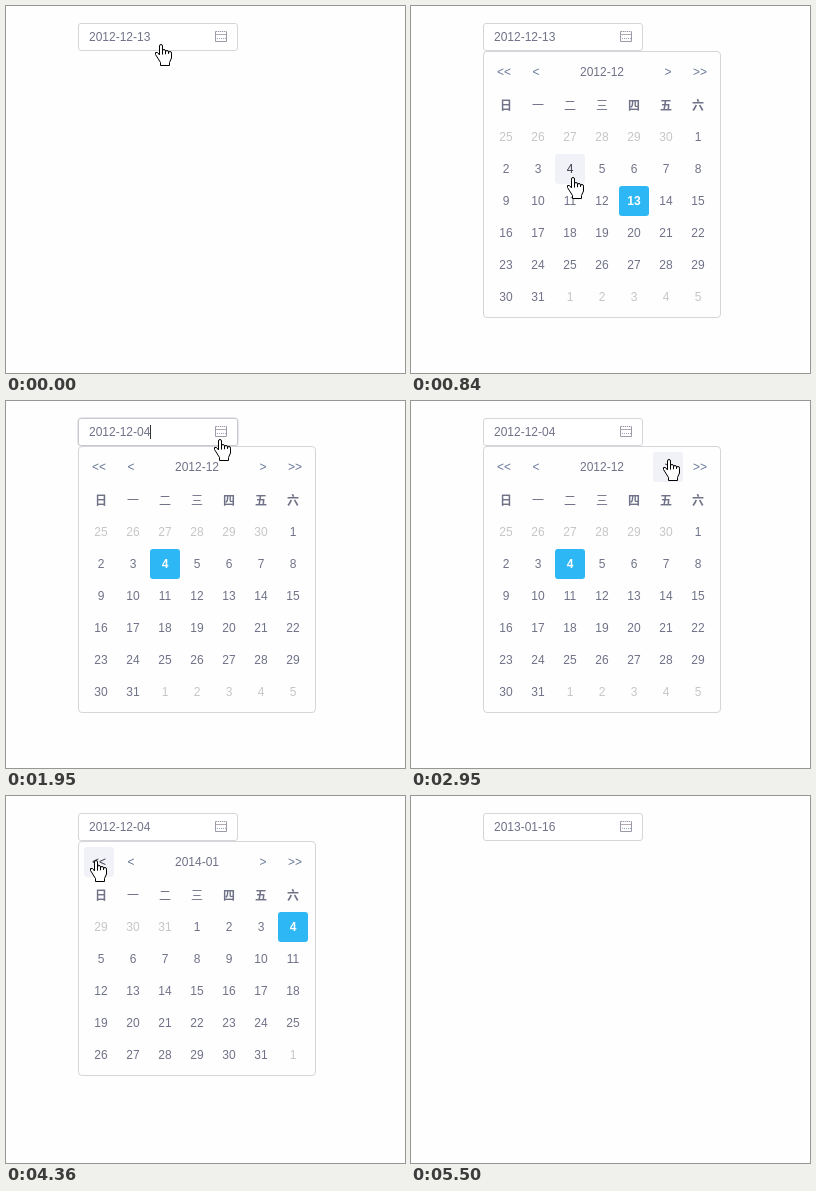
Animation of 399x367 px, one loop 6.49 s. Source, as an HTML page with a canvas:

```html
<!DOCTYPE html>
<html lang="zh">
<head>
<meta charset="utf-8">
<title>Date picker</title>
<style>
html, body { margin: 0; width: 100%; height: 100%; overflow: hidden; background: #fefefe; }
canvas { display: block; width: 399px; height: 367px; }
</style>
</head>
<body>
<canvas id="stage"></canvas>
<script>
const W = 399, H = 367, LOOP = 6490, BLINK = 540, TICK = 135;
const canvas = document.getElementById('stage');
const ctx = canvas.getContext('2d');
const dpr = window.devicePixelRatio || 1;
canvas.width = W * dpr;
canvas.height = H * dpr;

const SANS = '"Liberation Sans", Arial, sans-serif';
const CJK = '"Noto Sans CJK SC", "Noto Sans CJK", sans-serif';
const INK = '#707288', MUTED = '#c6c6c9', ARROW = '#647796', DARK = '#3a3d49';
const BLUE = '#2db7f5', HOVER = '#f0f2f7', BORDER = '#d6d6da', PAPER = '#fefefe';
const CELL = 30, STEP = 32, GRID_X = 80, GRID_Y = 116;

// User actions on the picker.
const focus = (s, at) => { s.focus = at; };
const blur = s => { s.focus = null; };
const open = s => { s.open = true; };
const turn = months => s => { s.view = new Date(s.view.getFullYear(), s.view.getMonth() + months, 1); };
const pick = day => s => {
  s.day = day;
  s.value = monthLabel(s.view) + '-' + pad(day);
  s.open = false;
};

const actions = [
  [150, focus], [300, open], [840, blur], [990, pick(4)],
  [1680, focus], [1800, open], [2370, blur],
  [3260, turn(1)], [3820, turn(12)], [4510, turn(-12)], [5080, pick(16)]
];

// Pointer moves: arrival time, ticks taken, place of the tip.
const moves = [
  [0, 1, 154, 38],
  [150, 1, 157, 31],
  [690, 3, 161, 171],
  [1290, 1, 117, 69],
  [1560, 2, 158, 29],
  [1950, 1, 213, 38],
  [2070, 1, 218, 34],
  [2950, 2, 257, 58],
  [3540, 1, 294, 60],
  [4360, 4, 89, 64],
  [4770, 3, 189, 209],
  [5370, 1, 320, 350],
  [5500, 1, W + 20, H + 20]
];

function pad(n) {
  return String(n).padStart(2, '0');
}

function monthLabel(date) {
  return date.getFullYear() + '-' + pad(date.getMonth() + 1);
}

function stateAt(t) {
  const s = { view: new Date(2012, 11, 1), focus: null };
  pick(13)(s);
  for (const [at, act] of actions) if (at <= t) act(s, at);

  let x = 0, y = 0;
  for (const [end, ticks, toX, toY] of moves) {
    const done = Math.floor((t - end) / TICK) + ticks;
    if (done <= 0) break;
    const left = 1 - Math.min(1, done / ticks);
    const ease = 1 - left * left;
    x += (toX - x) * ease;
    y += (toY - y) * ease;
  }
  s.x = Math.round(x);
  s.y = Math.round(y);
  return s;
}

function text(str, x, y, color, align = 'center', font = '12px ' + SANS) {
  ctx.font = font;
  ctx.textAlign = align;
  ctx.fillStyle = color;
  ctx.fillText(str, x, y);
}

function box(x, y, w, h, r, fill, stroke) {
  ctx.beginPath();
  ctx.roundRect(x, y, w, h, r);
  if (fill) { ctx.fillStyle = fill; ctx.fill(); }
  if (stroke) { ctx.strokeStyle = stroke; ctx.stroke(); }
}

function inside(s, x, y, w, h) {
  return s.x >= x && s.x < x + w && s.y >= y && s.y < y + h;
}

function icon() {
  box(209.5, 25.5, 11, 10, 0, null, '#9c9aa8');
  ctx.fillStyle = '#b3a8b4';
  ctx.fillRect(210, 28, 10, 1);
  for (let x = 211; x < 220; x += 2) {
    ctx.fillStyle = '#dcdce2';
    ctx.fillRect(x, 25, 1, 1);
    ctx.fillStyle = '#9aa2c0';
    ctx.fillRect(x, 32, 1, 1);
  }
}

function field(s, t) {
  const focused = s.focus !== null;
  if (focused) box(71.5, 16.5, 161, 29, 4, null, '#e6e6ea');
  box(72.5, 17.5, 159, 27, 2.5, '#fff', focused ? '#c9c9cf' : BORDER);
  text(s.value, 83, 35, INK, 'left');
  icon();
  if (focused && t - s.focus < BLINK) {
    ctx.fillStyle = '#333';
    ctx.fillRect(144, 24, 1, 14);
  }
}

// Draws the panel and tells whether the pointer is over something clickable.
function panel(s) {
  const year = s.view.getFullYear(), month = s.view.getMonth();
  const lead = s.view.getDay();
  const days = new Date(year, month + 1, 0).getDate();
  const rows = Math.ceil((lead + days) / 7);
  let hit = false;
  box(72.5, 45.5, 237, rows * STEP + 74, 3.5, PAPER, BORDER);

  ['<<', '<', '>', '>>'].forEach((label, i) => {
    const x = (i < 2 ? 93 : 193) + i * STEP;
    const over = inside(s, x - 15, 51, CELL, CELL);
    if (over) box(x - 15, 51, CELL, CELL, 3, HOVER);
    text(label, x, 70, over ? DARK : ARROW);
    hit = hit || over;
  });
  text(monthLabel(s.view), 191, 70, INK);

  [...'日一二三四五六'].forEach((c, i) => {
    const weight = i > 0 && i < 4 ? 400 : 700;
    text(c, 95 + i * STEP, 104, INK, 'center', weight + ' 12px ' + CJK);
  });

  for (let i = 0; i < rows * 7; i++) {
    const x = GRID_X + i % 7 * STEP, y = GRID_Y + Math.floor(i / 7) * STEP;
    const n = i - lead + 1;
    const current = n >= 1 && n <= days;
    const picked = n === s.day;
    const over = inside(s, x, y, CELL, CELL);
    if (picked || over) box(x, y, CELL, CELL, 3, picked ? BLUE : HOVER);
    const color = picked ? '#fff' : !current ? MUTED : over ? DARK : INK;
    const label = new Date(year, month, n).getDate();
    text(label, x + 15, y + 19, color, 'center', (picked ? 'bold ' : '') + '12px ' + SANS);
    hit = hit || over;
  }
  return hit;
}

function shape(path) {
  const p = new Path2D(path);
  ctx.fillStyle = '#fff';
  ctx.strokeStyle = '#000';
  ctx.fill(p);
  ctx.stroke(p);
}

function hand() {
  for (let i = 3; i >= 0; i--) {
    const top = i ? 4.5 + i : 0.5;
    box(4.5 + i * 3, top, 3, 14 - top, [1.5, 1.5, 0, 0], '#fff', '#000');
  }
  ctx.fillStyle = '#fff';
  ctx.fillRect(5, 11, 11, 4);
  shape('M4.5 11L2.5 8.5H.5V10.5L5.5 18.5V21.5H14.5V18.5L16.5 14V9.5');
}

function cursor(s, isHand) {
  ctx.save();
  ctx.translate(isHand ? s.x - 5 : s.x, s.y);
  ctx.lineJoin = 'round';
  if (isHand) hand();
  else shape('M.5 .5V16.5L4.5 12.5L7.5 18.5L9.5 17.5L6.5 11.5H11.5Z');
  ctx.restore();
}

function draw(t) {
  const s = stateAt(t);
  ctx.setTransform(dpr, 0, 0, dpr, 0, 0);
  ctx.lineWidth = 1;
  ctx.fillStyle = PAPER;
  ctx.fillRect(0, 0, W, H);
  field(s, t);
  const hit = s.open && panel(s);
  cursor(s, hit || inside(s, 72, 17, 160, 28));
}

const start = performance.now();
function tick() {
  draw((performance.now() - start) % LOOP);
  requestAnimationFrame(tick);
}
tick();
</script>
</body>
</html>
```
